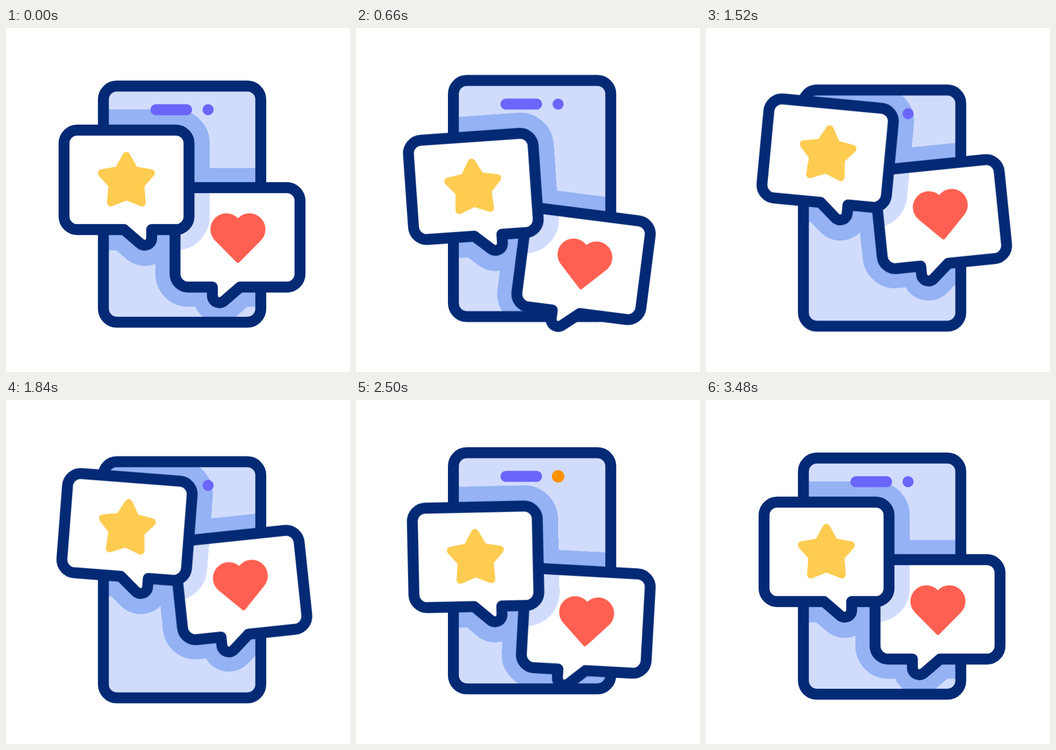
Recreate the animation shown at these times as an HTML page without scripts. Size 640 px wide and 640 px high, loop 3.6 s.

```html
<!DOCTYPE html>
<html lang="en">
<head>
<meta charset="utf-8">
<title>Phone with message bubbles</title>
<style>
  html, body { margin: 0; width: 100%; height: 100%; overflow: hidden; background: #fff; }
  svg { display: block; width: 100%; height: 100%; }

  .line { stroke: #042a75; stroke-width: 20.3; stroke-linejoin: round; }
  .screen { fill: #d1dcfd; }
  .shade { fill: #94b2f4; stroke: #94b2f4; stroke-linejoin: round; }
  .pale { fill: #d1dcfd; stroke: #d1dcfd; stroke-linejoin: round; }
  .wide-left { stroke-width: 77; }
  .wide-right { stroke-width: 73; }

  .phone, .left, .right, .lamp { animation: 3.6s linear infinite; }
  .phone { animation-name: phone; }
  .left { animation-name: left; transform-origin: 224px 331px; }
  .right { animation-name: right; transform-origin: 431px 331px; }
  .lamp { animation-name: lamp; }

  :root { --settle: cubic-bezier(.2, .6, .5, .9); }

  @keyframes phone {
    0% { transform: translateY(0); animation-timing-function: ease-in; }
    15.83% { transform: translateY(-20px); }
    18.33% { transform: translateY(-10.5px); animation-timing-function: var(--settle); }
    32.22% { transform: translateY(4.5px); animation-timing-function: ease-out; }
    48.33% { transform: translateY(8px); animation-timing-function: ease-in; }
    63.89% { transform: translateY(-16px); }
    69.44% { transform: translateY(-10px); animation-timing-function: ease-out; }
    81.11%, 100% { transform: translateY(0); }
  }
  @keyframes left {
    0% { transform: translate(0, 0) rotate(0deg); animation-timing-function: ease-in; }
    15.97% { transform: translate(-4px, 24px) rotate(-7deg); }
    18.33% { transform: translate(-2.6px, 12.2px) rotate(-4deg); animation-timing-function: var(--settle); }
    32.22% { transform: translate(-2.3px, -48px) rotate(5deg); animation-timing-function: ease-out; }
    43.33% { transform: translate(-2.5px, -50px) rotate(5.4deg); animation-timing-function: ease-in; }
    51.11% { transform: translate(-2.8px, -46.5px) rotate(4.4deg); animation-timing-function: ease-in; }
    60.83% { transform: translate(-1.5px, 19px) rotate(-4deg); }
    69.44% { transform: translate(-.7px, 9.3px) rotate(-1.25deg); }
    78.89% { transform: translate(-.2px, 0) rotate(1.9deg); }
    85% { transform: translate(-.3px, -20px) rotate(3.6deg); animation-timing-function: ease-out; }
    89.44% { transform: translate(-.2px, -28px) rotate(2.3deg); animation-timing-function: ease-in-out; }
    96.67%, 100% { transform: translate(0, 0) rotate(0deg); }
  }
  @keyframes right {
    0%, 2.78% { transform: translateY(0) rotate(0deg); animation-timing-function: cubic-bezier(.5, 0, 1, 1); }
    17.5% { transform: translateY(63px) rotate(9deg); }
    18.33% { transform: translateY(50px) rotate(7.3deg); animation-timing-function: var(--settle); }
    32.22% { transform: translateY(-32.5px) rotate(-4.1deg); animation-timing-function: ease-out; }
    48.33% { transform: translateY(-45.5px) rotate(-6.2deg); }
    51.11% { transform: translateY(-45px) rotate(-6deg); animation-timing-function: ease-in; }
    65.28% { transform: translateY(37px) rotate(5deg); }
    69.44% { transform: translateY(21.5px) rotate(3.2deg); }
    78.89% { transform: translateY(0) rotate(-1.4deg); }
    83.06% { transform: translateY(-9px) rotate(-2.6deg); animation-timing-function: ease-out; }
    88.89% { transform: translateY(-18px) rotate(-1.2deg); animation-timing-function: ease-in-out; }
    96.67%, 100% { transform: translateY(0) rotate(0deg); }
  }
  @keyframes lamp {
    0%, 29.44% { opacity: 0; }
    35% { opacity: 1; }
    40.56%, 62.78% { opacity: 0; }
    68.33%, 70% { opacity: 1; }
    75.56%, 100% { opacity: 0; }
  }
</style>
</head>
<body>
<svg viewBox="0 0 640 640">
  <defs>
    <rect id="case" x="181.2" y="108" width="292.8" height="439.3" rx="25"/>
    <path id="bubble-left" d="M132.5 190H316a24.5 24.5 0 0 1 24.5 24.5V350.5a24.5 24.5 0 0 1-24.5 24.5H271V391A13 13 0 0 1 249.5 400.9L219.5 375H132.5a24.5 24.5 0 0 1-24.5-24.5V214.5a24.5 24.5 0 0 1 24.5-24.5Z"/>
    <path id="bubble-right" d="M339 297H522.5a24.5 24.5 0 0 1 24.5 24.5V457.5a24.5 24.5 0 0 1-24.5 24.5H435.5L405.5 507.9A13 13 0 0 1 384 498V482H339a24.5 24.5 0 0 1-24.5-24.5V321.5a24.5 24.5 0 0 1 24.5-24.5Z"/>
    <clipPath id="in-case"><use href="#case" class="phone"/></clipPath>
    <clipPath id="in-right"><use href="#bubble-right" class="right"/></clipPath>
  </defs>

  <use href="#case" class="phone screen"/>
  <g clip-path="url(#in-case)">
    <use href="#bubble-right" class="right shade wide-right"/>
    <use href="#bubble-left" class="left shade wide-left"/>
  </g>
  <g class="phone">
    <use href="#case" class="line" fill="none"/>
    <path d="M279 152H336" stroke="#6b66fa" stroke-width="20.6" stroke-linecap="round"/>
    <circle cx="376" cy="152" r="10.3" fill="#6b66fa"/>
    <circle class="lamp" cx="376" cy="152" r="11.6" fill="#ff9100"/>
  </g>

  <use href="#bubble-right" class="right" fill="#fff"/>
  <g clip-path="url(#in-right)">
    <use href="#bubble-left" class="left pale wide-left"/>
  </g>
  <g class="right">
    <use href="#bubble-right" class="line" fill="none"/>
    <path fill="#ff6051" d="M431.5 354A29 29 0 0 0 388.5 395L428.5 435.5q3 3 6 0L474.5 395A29 29 0 0 0 431.5 354Z"/>
  </g>

  <g class="left">
    <use href="#bubble-left" class="line" fill="#fff"/>
    <path fill="#fdcc50" stroke="#fdcc50" stroke-width="14" stroke-linejoin="round" d="M224 237.5L239 264.5L270 270L250.5 292L253 325L224 313.5L195 325L197.5 292L178 270L209 264.5Z"/>
  </g>
</svg>
</body>
</html>
```
